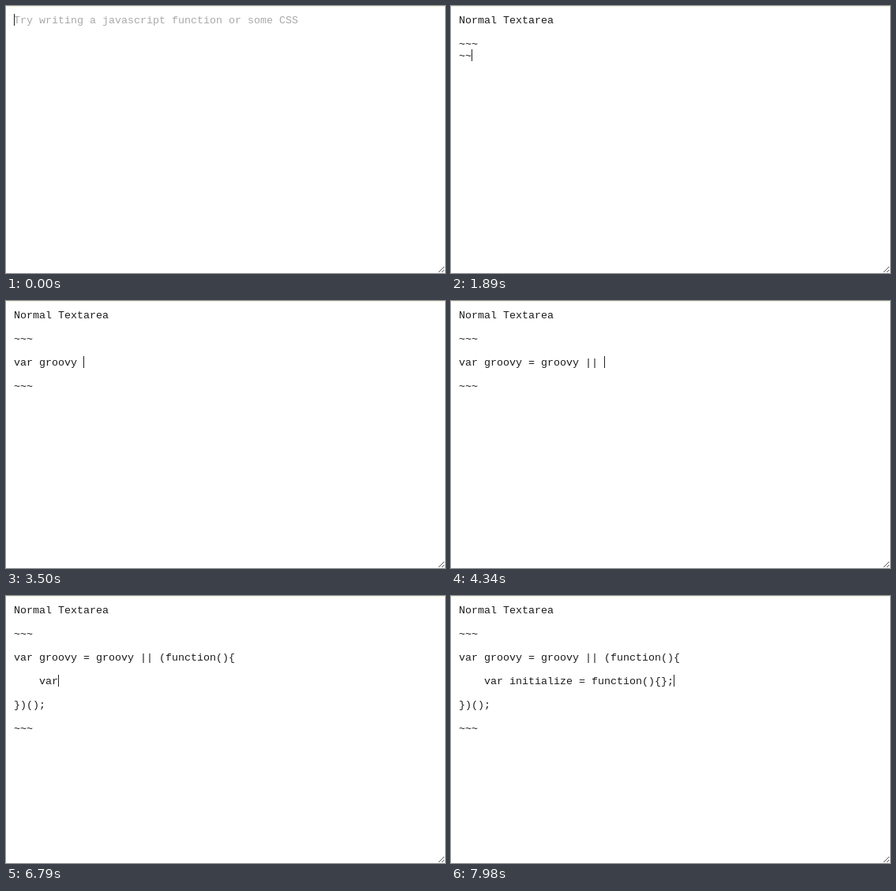
Write an HTML page that moves like this. It is 556x339 px and loops after 8000 ms.

```html
<!DOCTYPE html>
<html lang="en">
<head>
<meta charset="utf-8">
<title>Textarea typing</title>
<style>
  html, body { margin: 0; width: 100%; height: 100%; overflow: hidden; background: #fff; }
  body { position: relative; }
  #edge { position: absolute; left: 0; top: 0; width: 100%; height: 1px; background: #f3f4dc; }
  #text {
    position: absolute; left: 10px; top: 11px; margin: 0; color: #1c1c1c;
    font: 13.333px/15px "Liberation Mono", monospace;
  }
  #text.empty { color: #a9a9a9; }
  #caret { position: absolute; width: 1px; height: 15px; background: #222; }
  #grip { position: absolute; left: 546px; top: 329px; }
</style>
</head>
<body>
<div id="edge"></div>
<pre id="text"></pre>
<div id="caret"></div>
<svg id="grip" width="10" height="10" stroke="#555" stroke-width="1">
  <path d="M2 9 L9 2 M6 9 L9 6"/>
</svg>
<script>
const LOOP = 8000, TICK = 70, CHAR_W = 8, LINE_H = 15, LEFT = 10, TOP = 10;
const PLACEHOLDER = "Try writing a javascript function or some CSS";

// [start ms, keys, keys per tick]; arrows move the caret
const bursts = [
  [70, "Norma"], [490, "l "], [700, "Tex"], [980, "tarea"],
  [1400, "\n\n~~~\n~~~↑"], [2170, "\n"], [2310, "\n"], [2450, "\n↑"],
  [2660, "v"], [2800, "ar groo"], [3360, "vy = groov"], [4130, "y ", 2],
  [4200, "|| ()"], [4620, "();←←←←"], [5180, "function()"],
  [5880, "{}", 2], [5950, "←"], [6090, "\n\n", 2], [6230, "\n"], [6510, "\n"],
  [6580, "↑↑", 2], [6650, "    v", 5], [6790, "ar", 2],
  [6860, " initialize = function", 2], [7630, "()"], [7840, "{};"]
];

const keys = bursts.flatMap(([start, chars, perTick = 1]) =>
  [...chars].map((key, i) => ({ key, at: start + Math.floor(i / perTick) * TICK })));

function lineUp(text, pos) {
  const lineStart = text.lastIndexOf("\n", pos - 1) + 1;
  const above = text.slice(0, lineStart - 1);
  const aboveStart = above.lastIndexOf("\n") + 1;
  return Math.min(aboveStart + pos - lineStart, above.length);
}

function editorAt(time) {
  let text = "", pos = 0;
  for (const { key, at } of keys) {
    if (at > time) break;
    if (key === "←") pos--;
    else if (key === "↑") pos = lineUp(text, pos);
    else {
      text = text.slice(0, pos) + key + text.slice(pos);
      pos++;
    }
  }
  return { text, pos };
}

const textEl = document.getElementById("text");
const caretEl = document.getElementById("caret");

function draw() {
  const { text, pos } = editorAt(performance.now() % LOOP);
  const linesBefore = text.slice(0, pos).split("\n");
  textEl.textContent = text || PLACEHOLDER;
  textEl.classList.toggle("empty", !text);
  caretEl.style.left = LEFT + linesBefore.at(-1).length * CHAR_W + "px";
  caretEl.style.top = TOP + (linesBefore.length - 1) * LINE_H + "px";
  requestAnimationFrame(draw);
}
draw();
</script>
</body>
</html>
```
